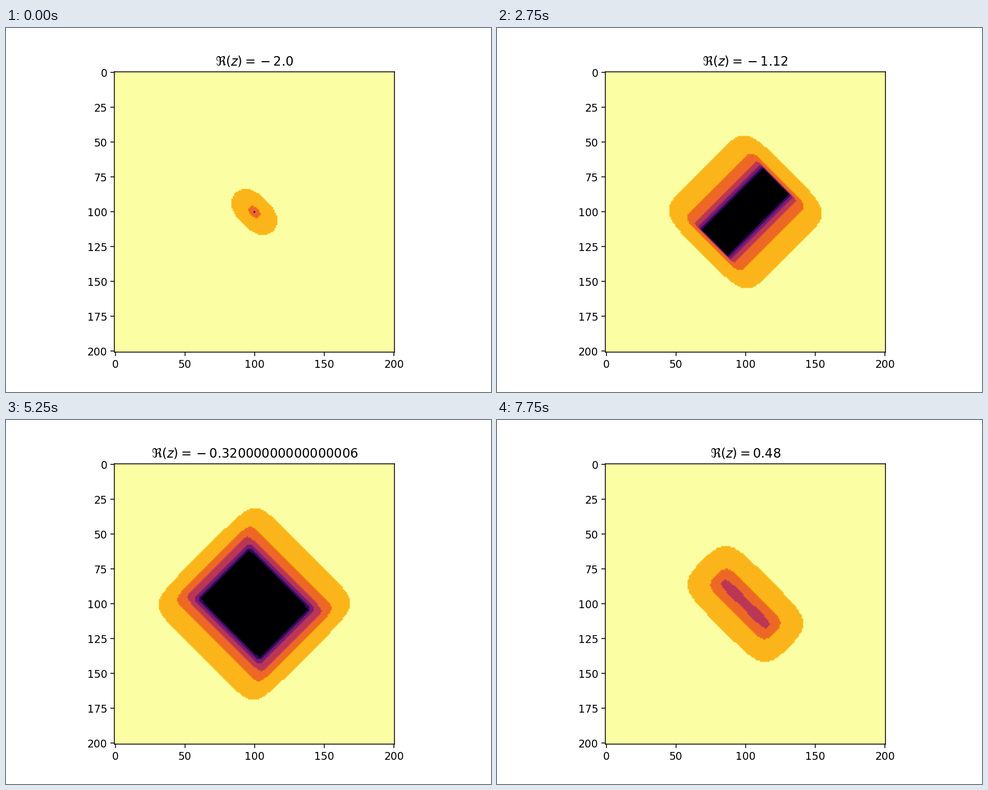
A matplotlib script for the animation above (8 s loop, 864x648 px).

```python
import numpy as np
import matplotlib.pyplot as plt
from matplotlib.animation import FuncAnimation

SIZE = 201          # grid points per axis
FRAMES = 32
FIRST, LAST = 3, 8  # iterates whose size is tested
BAILOUT = 4.0

axis = np.linspace(-2, 2, SIZE)
reals = np.linspace(-2, 2, 51)
cols, rows = np.meshgrid(axis, axis)


def escape_levels(x):
    """Count bounded iterates of z -> z^2 + c for c = x + y*k + w*k^3, k^4 = 1.

    The algebra splits into two real parts and one complex pair.
    """
    diff = cols - rows
    parts = [x + diff, x - diff, x + 1j * (cols + rows)]
    weights = [0.25, 0.25, 0.5]
    z = [p.copy() for p in parts]
    alive = np.ones((SIZE, SIZE), bool)
    levels = np.zeros((SIZE, SIZE))
    for n in range(1, LAST + 1):
        if n > 1:
            z = [np.where(alive, v * v + c, v) for v, c in zip(z, parts)]
        norm2 = sum(w * np.abs(v) ** 2 for w, v in zip(weights, z))
        alive &= norm2 <= BAILOUT ** 2
        if n >= FIRST:
            levels += alive
    return levels


def title_text(x):
    # The empty group keeps the wide spacing around the minus sign.
    return r"$\Re(z)={}" + str(float(x)) + "$"


fig, ax = plt.subplots(figsize=(6.4, 4.8), dpi=135)
image = ax.imshow(escape_levels(reals[0]), cmap="inferno_r",
                  vmin=0, vmax=LAST - FIRST + 1)
title = ax.set_title(title_text(reals[0]))


def update(i):
    image.set_data(escape_levels(reals[i]))
    title.set_text(title_text(reals[i]))
    return image, title


anim = FuncAnimation(fig, update, frames=FRAMES, interval=250,
                     repeat=True, repeat_delay=0, blit=False)
plt.show()
```
